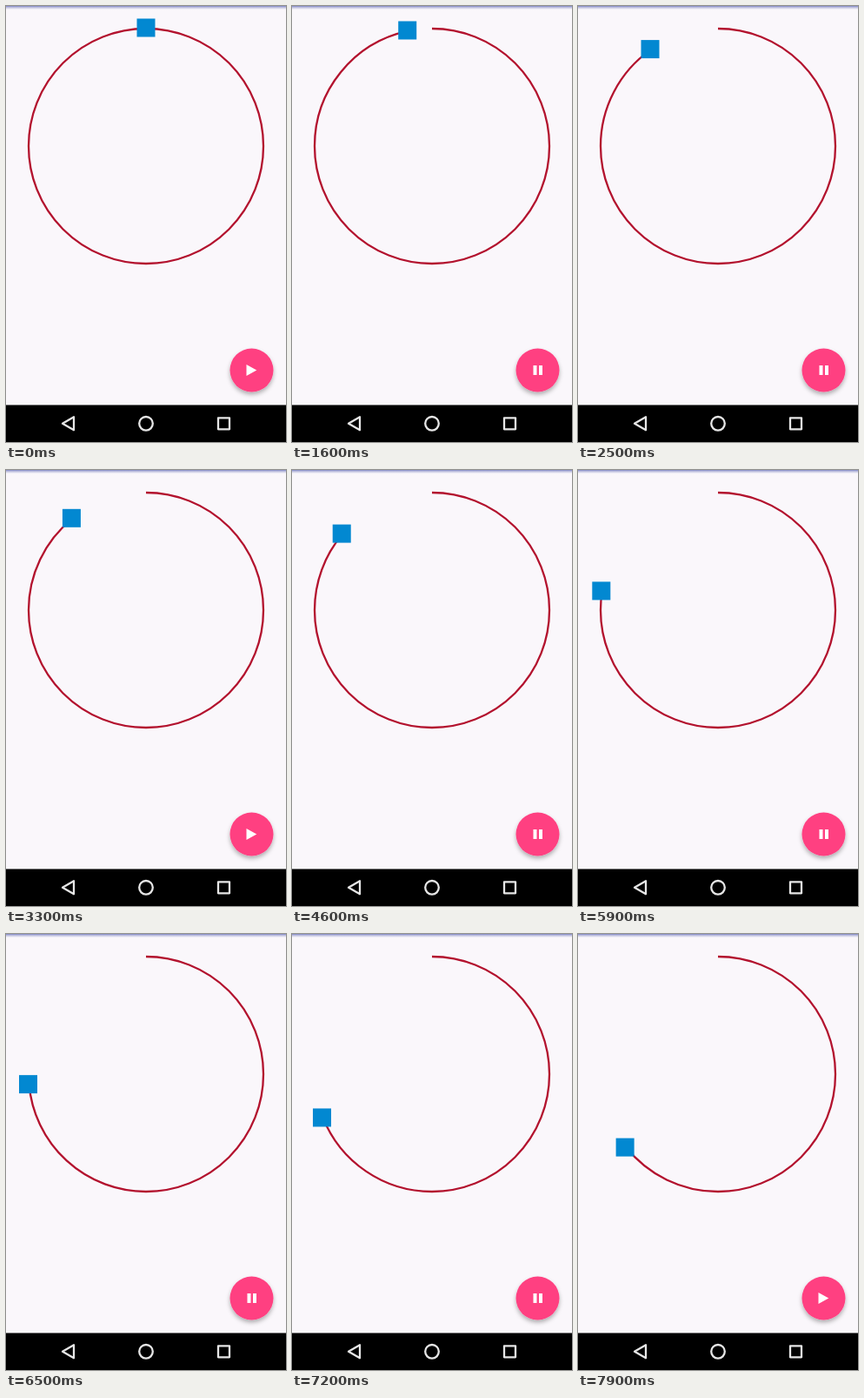
Recreate the animation shown at these times as an HTML page. Size 322x501 px, loop 8000 ms.

```html
<!DOCTYPE html>
<html lang="en">
<head>
<meta charset="utf-8">
<title>Circular path animation</title>
<style>
  html, body { margin: 0; height: 100%; overflow: hidden; background: #faf7fb; }
  svg { display: block; width: 322px; height: 501px; }
</style>
</head>
<body>
<svg viewBox="0 0 322 501">
  <defs>
    <linearGradient id="topShade" x2="0" y2="1">
      <stop offset="0" stop-color="#7c84c4"/>
      <stop offset=".35" stop-color="#b9bbdd"/>
      <stop offset="1" stop-color="#faf7fb"/>
    </linearGradient>
    <filter id="shadow" x="-30%" y="-30%" width="160%" height="170%">
      <feDropShadow dx="0" dy="3" stdDeviation="2.5" flood-opacity=".3"/>
    </filter>
  </defs>

  <rect width="322" height="501" fill="#faf7fb"/>
  <rect width="322" height="4" fill="url(#topShade)"/>

  <circle id="ring" cx="161" cy="161" r="135" pathLength="360" transform="rotate(-90 161 161)"
          fill="none" stroke="#b3122e" stroke-width="2.3"/>
  <rect id="box" width="21" height="21" fill="#0288d1"/>

  <circle cx="282.5" cy="418.5" r="25" fill="#ff4081" filter="url(#shadow)"/>
  <path id="icon" fill="#fff"/>

  <rect y="458.5" width="322" height="42.5"/>
  <g fill="none" stroke="#e6e6e6" stroke-width="2.3" stroke-linejoin="round">
    <path d="M65 479.8L78 472.3V487.3Z"/>
    <circle cx="161" cy="479.8" r="7.8"/>
    <rect x="244" y="473.3" width="13" height="13"/>
  </g>
</svg>
<script>
  const LOOP = 8, STEP = 0.1, CENTER = 161, RADIUS = 136, BOX = 21;
  const PLAY = 'M276.5 412V425L288.3 418.5Z';
  const PAUSE = 'M277.5 413h4v11h-4zM284 413h4v11h-4z';

  // [seconds, degrees travelled anticlockwise from the top]
  const travel = [[0, 0], [1.1, 0], [1.6, 12], [1.8, 16.5], [2.5, 35], [2.7, 39],
                  [4.2, 39], [4.3, 42.6], [7.9, 128.2], [8, 128.2]];

  const $ = id => document.getElementById(id);
  const ring = $('ring'), box = $('box'), icon = $('icon');

  function angleAt(t) {
    const i = travel.findIndex(([time]) => time > t);
    const [t0, a0] = travel[i - 1], [t1, a1] = travel[i];
    return a0 + (a1 - a0) * (t - t0) / (t1 - t0);
  }

  const isRunning = t => (t >= 1 && t < 2.8) || (t >= 4.3 && t < 7.9);

  function draw(now) {
    // The picture updates ten times a second
    const t = Math.floor((now / 1000 % LOOP) / STEP + 1e-6) / 10 % LOOP;
    const angle = angleAt(t), rad = angle * Math.PI / 180;
    ring.setAttribute('stroke-dasharray', `${360 - angle} 360`);
    box.setAttribute('x', CENTER - RADIUS * Math.sin(rad) - BOX / 2);
    box.setAttribute('y', CENTER - RADIUS * Math.cos(rad) - BOX / 2);
    icon.setAttribute('d', isRunning(t) ? PAUSE : PLAY);
  }

  let start;
  function tick(now) {
    start ??= now;
    draw(now - start);
    requestAnimationFrame(tick);
  }
  draw(0);
  requestAnimationFrame(tick);
</script>
</body>
</html>
```
